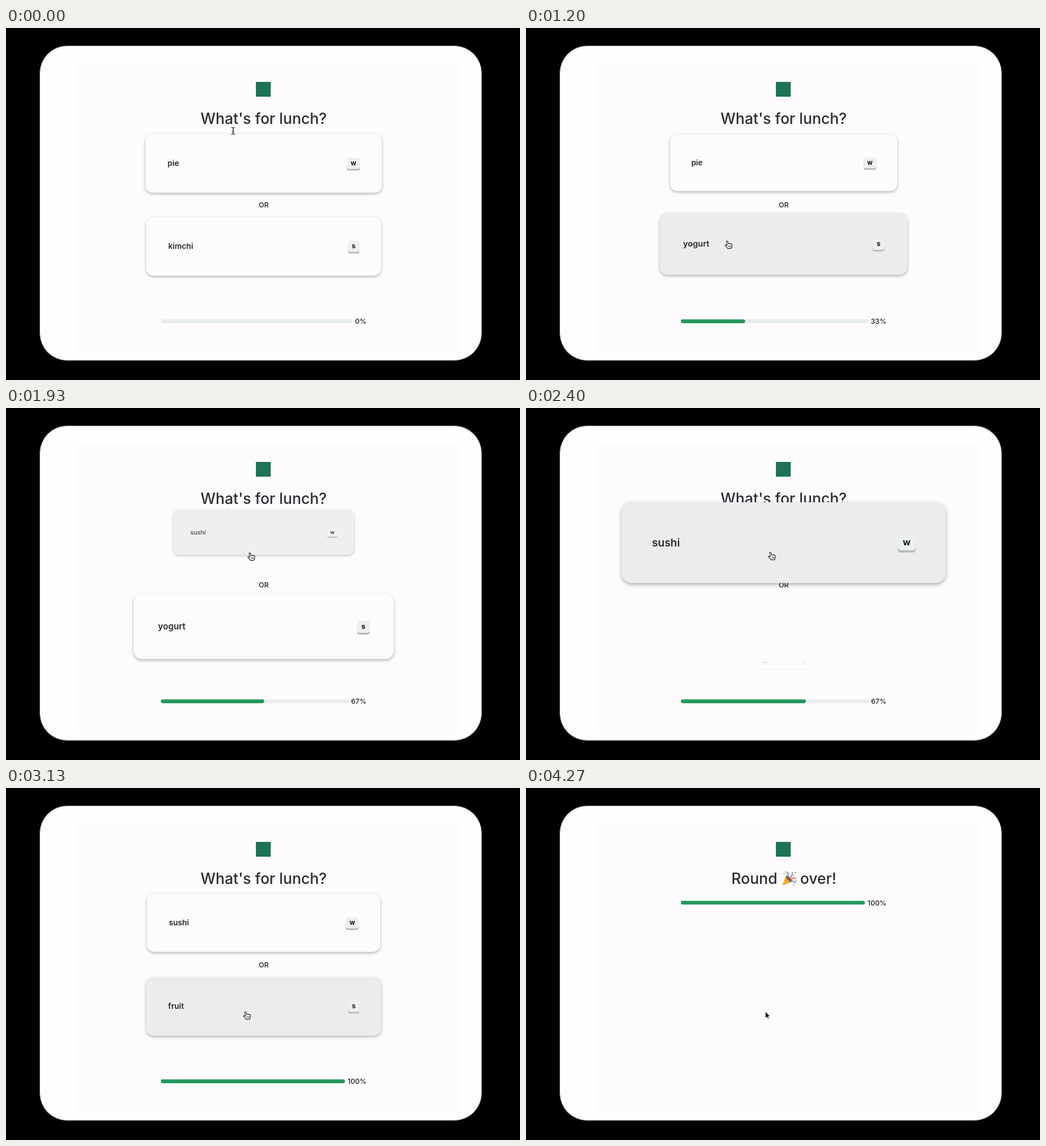
Recreate the animation shown at these times as an HTML page. Size 903x620 px, loop 4.34 s.

```html
<!DOCTYPE html>
<html lang="en">
<head>
<meta charset="utf-8">
<title>What's for lunch?</title>
<style>
  html, body { margin: 0; width: 100%; height: 100%; overflow: hidden; background: #000; }
  svg { display: block; width: 903px; height: 620px; font-family: Inter, "Open Sans", sans-serif; }
  .title { font-size: 26.4px; font-weight: 500; fill: #2e2b30; }
  .small { font-size: 12.3px; font-weight: 500; fill: #1d1b1e; }
  .word { font-size: 13.7px; font-weight: 600; fill: #2b282c; }
  .letter { font-size: 11.5px; font-weight: 700; fill: #151416; text-anchor: middle; }
  .face { filter: drop-shadow(0 2px 2.5px rgba(0, 0, 0, .3)); }
  .middle { text-anchor: middle; }
  .end { text-anchor: end; }
</style>
</head>
<body>
<svg viewBox="0 0 903 620" xmlns="http://www.w3.org/2000/svg">
  <rect width="903" height="620"/>
  <rect x="59.5" y="31.5" width="776" height="554" rx="48" fill="#fffeff" stroke="#8d8a8d"/>
  <rect x="125" y="62" width="675" height="512" fill="#fdfbfe"/>
  <rect x="439" y="95" width="26" height="26" fill="#1f7456"/>

  <g id="question">
    <text class="title middle" x="452.7" y="169">What's for lunch?</text>
    <text class="small middle" x="452.7" y="315.7">OR</text>
  </g>

  <g id="over">
    <text class="title end" x="441.5" y="169">Round</text>
    <text class="title" x="481.5" y="169">over!</text>
    <g transform="translate(448 146)">
      <path d="M2 26 9 9Q18 12 19 19Z" fill="#f5b73c"/>
      <path d="M4 21 7 24M6 15 12 22M8 11 17 20" stroke="#d98a25" stroke-width="1.6"/>
      <ellipse cx="14" cy="14" rx="7" ry="3" transform="rotate(45 14 14)" fill="#8c5a20"/>
      <g fill="none" stroke-width="1.8" stroke-linecap="round">
        <path d="M12 11Q14 6 11 2" stroke="#4a90d9"/>
        <path d="M15 12Q20 10 20 3" stroke="#a25bc4"/>
        <path d="M17 15Q21 11 26 13" stroke="#e0566b"/>
        <path d="M18 18Q22 17 25 21" stroke="#4a90d9"/>
      </g>
      <g fill="#f2b632"><circle cx="5" cy="5" r="1.3"/><circle cx="23" cy="8" r="1.3"/><circle cx="22" cy="25" r="1.2"/></g>
      <g fill="#55a868"><circle cx="8" cy="2" r="1"/><circle cx="25" cy="3" r="1.2"/><circle cx="26" cy="17" r="1"/></g>
    </g>
  </g>

  <g id="progress">
    <rect id="track" x="272" y="-3.3" width="336" height="6.6" rx="3.3" fill="#e9eced"/>
    <rect id="bar" x="272" y="-3.3" width="0" height="6.6" rx="3.3" fill="#24995c"/>
    <text id="percent" class="small end" x="633.3" y="4.6"></text>
  </g>

  <g id="cards"></g>

  <g id="cursor" stroke-linejoin="round" stroke-linecap="round">
    <path id="beam" d="M-3-6Q0-6 0-4Q0-6 3-6M0-4V4M-3 6Q0 6 0 4Q0 6 3 6M-1.5 1H1.5" fill="none" stroke="#222" stroke-width="1.2"/>
    <path id="arrow" d="M0 0V11.5L2.7 9 4.6 13 6.4 12.2 4.6 8.3H8Z" fill="#000" stroke="#fff" stroke-width=".8"/>
    <g id="hand" fill="#fff" stroke="#1b1b1b" stroke-width="1.1">
      <path d="M-1 1Q0-.8 1.2 .8L2.5 5Q3.8 3.6 4.9 5Q6.2 4 7 5.4Q8.4 4.7 8.9 6.3L8.8 10.2 7.4 13.4H1.6L-3.2 8.2Q-3.3 6.3-1.2 7L.5 8.2Z"/>
      <path d="M3.2 8.3V10.7M5 8.3V10.7M6.8 8.3V10.7" stroke-width=".8"/>
    </g>
  </g>
</svg>

<script>
const LOOP = 4340, STEP = 1000 / 15, LAST = 64, OVER = 3650;
const WIDTH = 411, HEIGHT = 102.8, CENTER = 452.7, SLIDE = 81;
const PICKS = [412, 1345, 2275, 3200];
const DROPS = [892, 1809, 2727];
const NEVER = Infinity;

const CARDS = [
  { word: "pie", top: true, enter: -390, pick: PICKS[0], drop: DROPS[0], exit: PICKS[1] },
  { word: "kimchi", top: false, enter: -410, pick: NEVER, drop: NEVER, exit: PICKS[0] },
  { word: "yogurt", top: false, enter: DROPS[0], pick: PICKS[1], drop: DROPS[1], exit: PICKS[2] },
  { word: "sushi", top: true, enter: DROPS[1], pick: PICKS[2], drop: DROPS[2], exit: PICKS[3] },
  { word: "fruit", top: false, enter: DROPS[2], pick: PICKS[3], drop: NEVER, exit: NEVER }
];

// time, x, y of the pointer's hot spot
const POINTER = [
  [0, 399, 181], [330, 364, 256], [790, 364, 256], [1130, 353, 375], [1520, 353, 375],
  [1860, 428, 255], [2400, 429, 254], [2740, 429, 254], [3080, 420.5, 394]
];

const $ = id => document.getElementById(id);
const clamp = v => Math.min(1, Math.max(0, v));
const show = (el, on) => el.setAttribute("display", on ? "inline" : "none");

// Unit step response of an underdamped spring, ms in.
function spring(ms, stiffness = 260, damping = 20) {
  if (!(ms > 0)) return 0;
  const s = ms / 1000, decay = damping / 2;
  const freq = Math.sqrt(stiffness - decay * decay);
  return 1 - Math.exp(-decay * s) * (Math.cos(freq * s) + decay / freq * Math.sin(freq * s));
}

function makeCard(card) {
  const key = card.top ? "w" : "s", keyWidth = card.top ? 23 : 20, keyX = 167.5 - keyWidth;
  card.el = document.createElementNS("http://www.w3.org/2000/svg", "g");
  card.el.innerHTML = `
    <rect class="face" x="${-WIDTH / 2}" y="${-HEIGHT / 2}" width="${WIDTH}" height="${HEIGHT}" rx="13"/>
    <text class="word" x="-167" y="4.7">${card.word}</text>
    <rect x="${keyX}" y="-6" width="${keyWidth}" height="18.6" rx="4" fill="#b4b8b9"/>
    <rect x="${keyX}" y="-9.5" width="${keyWidth}" height="19.3" rx="4" fill="#edf0f1"/>
    <text class="letter" x="${keyX + keyWidth / 2}" y="3.6">${key}</text>`;
  card.face = card.el.firstElementChild;
  $("cards").append(card.el);
}

function pointerAt(t) {
  const next = POINTER.findIndex(p => p[0] > t);
  if (next < 0) return POINTER.at(-1).slice(1);
  const [t0, x0, y0] = POINTER[next - 1], [t1, x1, y1] = POINTER[next];
  const u = (t - t0) / (t1 - t0), e = u * u * (3 - 2 * u);
  return [x0 + (x1 - x0) * e, y0 + (y1 - y0) * e];
}

function drawCard(card, t, [px, py]) {
  const presence = spring(t - card.enter) - spring(t - card.exit);
  const visible = presence > 0.01 && t < OVER;
  show(card.el, visible);
  if (!visible) return false;

  const scale = presence + 0.5 * (spring(t - card.pick) - spring(t - card.drop));
  const y = (card.top ? 237.4 : 385) + (1 - presence) * (card.top ? -SLIDE : SLIDE);
  const inside = inset =>
    Math.abs(px - CENTER) < WIDTH / 2 * scale - inset && Math.abs(py - y) < HEIGHT / 2 * scale - inset;

  card.el.setAttribute("transform", `translate(${CENTER} ${y}) scale(${scale})`);
  card.el.setAttribute("opacity", clamp(presence));
  card.face.setAttribute("fill", inside(3) ? "#edebee" : "#fdfbfe");
  if (t >= card.pick && t < card.exit && $("cards").lastChild !== card.el) $("cards").append(card.el);
  return inside(0);
}

function drawProgress(t, over) {
  const rounds = DROPS.filter(d => t >= d).length;
  const value = DROPS.reduce((sum, d) => sum + spring(t - d, 225, 22.5) / 3, 0);
  const track = [336, 329.5, 329.5, 323.5][rounds];
  $("progress").setAttribute("transform", `translate(0 ${over ? 202 : 516.6})`);
  $("track").setAttribute("width", track);
  $("bar").setAttribute("width", track * clamp(value));
  $("percent").textContent = Math.round(rounds * 100 / 3) + "%";
}

function draw(t) {
  const over = t >= OVER, pointer = pointerAt(t);
  show($("question"), !over);
  show($("over"), over);
  drawProgress(t, over);

  const onCard = CARDS.map(card => drawCard(card, t, pointer)).includes(true);
  const onTitle = t < 300 && pointer[1] < 186;
  show($("hand"), onCard);
  show($("beam"), !onCard && onTitle);
  show($("arrow"), !onCard && !onTitle);
  $("cursor").setAttribute("transform", `translate(${pointer})`);
}

CARDS.forEach(makeCard);
const start = performance.now();
function tick() {
  const t = (performance.now() - start) % LOOP;
  // The picture advances 15 times a second; steps start on rounded-down times.
  draw(Math.min(LAST, Math.floor((t + 7) / STEP)) * STEP);
  requestAnimationFrame(tick);
}
tick();
</script>
</body>
</html>
```
